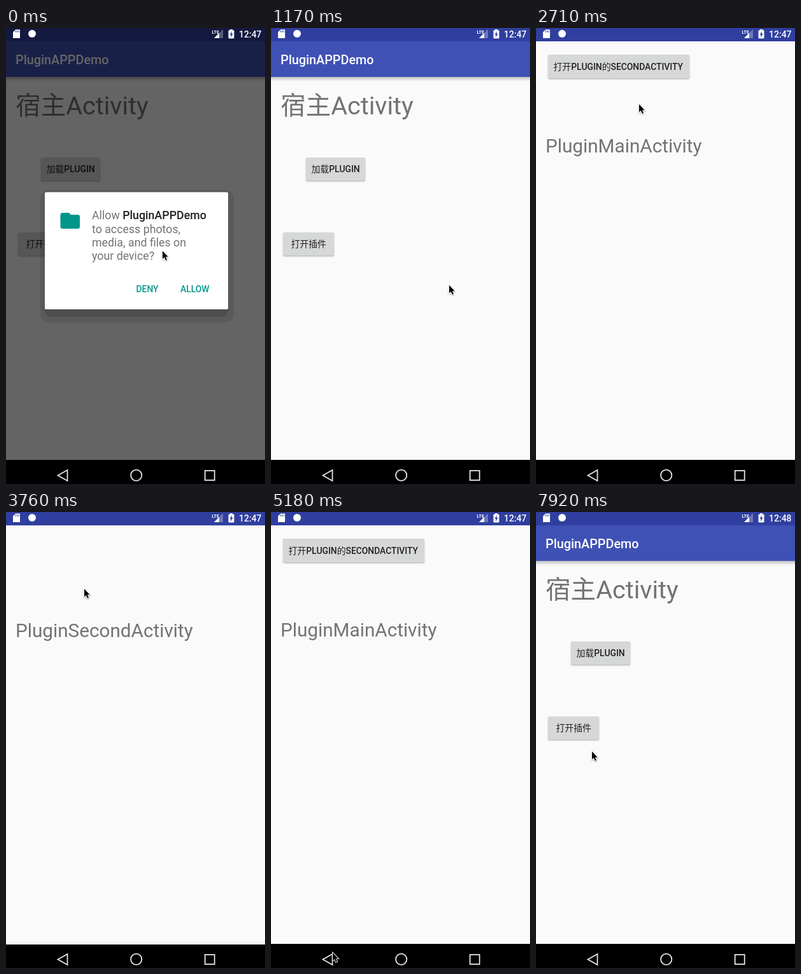
An HTML page with a canvas that plays this animation: 407x718 px, repeating every 8 s.

```html
<!DOCTYPE html>
<html lang="zh-CN">
<head>
<meta charset="utf-8">
<style>
html, body { margin: 0; width: 100%; height: 100%; overflow: hidden; background: #000; }
canvas { display: block; }
</style>
</head>
<body>
<canvas width="407" height="718"></canvas>
<script>
const c = document.querySelector('canvas').getContext('2d');
const LOOP = 8000, STEP = 118;
const GREY = '#737373', TEAL = '#009688';

// Cursor keys: step, x, y
const path = [
  [0, 246, 351], [1, 266, 380], [2, 276, 394], [3, 276, 394], [6, 280, 405], [10, 280, 405],
  [12, 160, 270], [13, 108, 226], [15, 107, 227], [17, 82, 342], [19, 84, 342],
  [21, 125, 322], [22, 180, 257], [23, 162, 120], [25, 124, 66], [30, 124, 66],
  [32, 123, 121], [34, 112, 556], [35, 112, 556], [37, 97, 694], [61, 97, 694],
  [64, 96, 520], [67, 88, 377]
];

// Window states: first step, lower window, upper window, upper offset, upper alpha
const states = [
  [0, host, null, 0, 1],
  [19, host, plugin, 18, .75], [20, host, plugin, 3, 1], [21, plugin, null, 0, 1],
  [31, plugin, second, 14, .85], [32, plugin, second, 1, 1], [33, second, null, 0, 1],
  [43, plugin, second, 14, .5], [44, plugin, null, 0, 1],
  [52, host, plugin, 2, .97], [53, host, plugin, 14, .5], [54, host, null, 0, 1]
];

const within = (n, a, b) => n >= a && n <= b;

function rect(x, y, w, h, color, r = 0) {
  c.fillStyle = color;
  c.beginPath();
  c.roundRect(x, y, w, h, r);
  c.fill();
}

function poly(points, color) {
  c.beginPath();
  points.forEach(([x, y]) => c.lineTo(x, y));
  c.closePath();
  if (color) { c.fillStyle = color; c.fill(); }
}

// Han runs stay at regular weight; returns the end position
function text(s, x, y, size, color, weight = 400) {
  c.fillStyle = color;
  for (const run of s.match(/[一-龥]+|[^一-龥]+/g)) {
    const w = /[一-龥]/.test(run) ? 400 : weight;
    c.font = `${w} ${size}px Roboto, "Noto Sans CJK SC", "Noto Sans CJK", sans-serif`;
    c.fillText(run, x, y);
    x += c.measureText(run).width;
  }
  return x;
}

function button(label, x, y, w, h, pressed) {
  c.save();
  c.shadowColor = 'rgba(0,0,0,.32)';
  c.shadowBlur = pressed ? 5 : 2;
  c.shadowOffsetY = pressed ? 2 : 1;
  rect(x, y, w, h, pressed ? '#c9caca' : '#d6d7d7', 2);
  c.restore();
  text(label, x + (w > 90 ? 8.5 : 12.5), y + h / 2 + 5, 13.86, '#212121', 500);
}

function host(n) {
  rect(0, 21, 407, 659, '#fafafa');
  const shade = c.createLinearGradient(0, 77, 0, 84);
  shade.addColorStop(0, 'rgba(0,0,0,.24)');
  shade.addColorStop(1, 'rgba(0,0,0,0)');
  rect(0, 77, 407, 7, shade);
  rect(0, 21, 407, 56, '#3f51b5');
  text('PluginAPPDemo', 15, 56.5, 19.8, '#fff', 500);
  text('宿主Activity', 15, 135.5, 39.6, GREY);
  button('加载PLUGIN', 55, 204, 93, 36.5, within(n, 14, 15));
  button('打开插件', 19, 322, 80, 36.5, within(n, 17, 18));
}

function plugin(n) {
  rect(0, 21, 407, 659, '#fafafa');
  button('打开PLUGIN的SECONDACTIVITY', 19, 42, 222, 37.5, within(n, 26, 28));
  text('PluginMainActivity', 15, 196, 29.7, GREY);
}

function second() {
  rect(0, 21, 407, 659, '#fafafa');
  text('PluginSecondActivity', 15, 196, 29.7, GREY);
}

function dialog() {
  rect(0, 0, 407, 680, 'rgba(0,0,0,.6)');
  rect(54, 255, 304, 208.5, 'rgba(0,0,0,.1)', 14);
  rect(61, 262, 288, 193, 'rgba(0,0,0,.15)', 10);
  rect(61, 258.5, 288, 184.5, '#fff', 2);
  rect(85.5, 294, 30.5, 22, TEAL, 3);
  rect(85.5, 291, 15, 10, TEAL, 3);
  poly([[97, 291], [99, 291], [102, 294.5], [97, 294.5]], TEAL);
  const x = text('Allow ', 135, 301, 17.8, GREY);
  text('PluginAPPDemo', x, 301, 17.8, '#212121', 500);
  ['to access photos,', 'media, and files on', 'your device?']
    .forEach((line, i) => text(line, 135, 322.5 + i * 21.3, 17.8, GREY));
  text('DENY', 204.5, 416, 13.86, TEAL, 500);
  text('ALLOW', 274, 416, 13.86, TEAL, 500);
}

function statusIcons(n) {
  poly([[15, 2.5], [22, 2.5], [22, 16], [11, 16], [11, 6.5]], '#fff');
  [14.5, 17, 19.5].forEach(x => rect(x, 4, 1, 3, '#303f9f'));
  c.fillStyle = '#fff';
  c.beginPath();
  c.arc(41, 9, 6, 0, 7);
  c.fill();
  text('LTE', 323.5, 8.5, 7, '#fff', 700);
  poly([[341, 2], [341, 16], [327, 16]], 'rgba(255,255,255,.3)');
  poly([[335, 8], [335, 16], [327, 16]], '#fff');
  rect(349.5, 3.5, 9, 13, '#fff', 1);
  rect(352, 2, 4, 2, '#fff');
  poly([[355, 5], [351.5, 10.5], [353.5, 10.5], [353, 15], [356.7, 9], [354.5, 9]], '#303f9f');
  text(n < 65 ? '12:47' : '12:48', 366, 14.7, 14, '#fff', 500);
}

function navIcons(n) {
  if (within(n, 38, 42) || within(n, 50, 53)) {
    const grow = Math.min(1, .6 + (n - (n < 50 ? 38 : 50)) * .2);
    c.save();
    c.beginPath();
    c.rect(0, 680, 407, 38);
    c.clip();
    rect(89 - 54 * grow, 680, 108 * grow, 42, 'rgba(255,255,255,.09)', 20);
    c.restore();
  }
  c.strokeStyle = '#e6e6e6';
  c.lineWidth = 1.8;
  poly([[81.5, 704.5], [96.5, 696], [96.5, 713]]);
  c.stroke();
  c.beginPath();
  c.arc(204.7, 704.3, 8.6, 0, 7);
  c.stroke();
  c.strokeRect(312.7, 697, 15, 15);
}

function cursor(n) {
  const i = Math.max(1, path.findIndex(k => k[0] >= n));
  const [n0, x0, y0] = path[i - 1], [n1, x1, y1] = path[i];
  const p = (n - n0) / (n1 - n0);
  c.save();
  c.translate(x0 + (x1 - x0) * p, y0 + (y1 - y0) * p);
  c.shadowColor = 'rgba(0,0,0,.35)';
  c.shadowBlur = 2;
  c.shadowOffsetY = 1;
  poly([[0, 0], [0, 12.5], [2.8, 10], [5, 14.8], [7, 13.9], [4.9, 9.2], [8.7, 9.2]]);
  c.strokeStyle = '#fff';
  c.lineWidth = 1.8;
  c.stroke();
  c.shadowColor = 'transparent';
  c.fillStyle = '#000';
  c.fill();
  c.restore();
}

function draw(now) {
  const n = Math.floor((now % LOOP + 16) / STEP);
  const [, lower, upper, offset, alpha] = states.findLast(s => s[0] <= n);
  rect(0, 0, 407, 718, '#000');
  rect(0, 0, 407, 21, '#303f9f');
  lower(n);
  if (upper) {
    rect(0, 21, 407, 659, 'rgba(0,0,0,.07)');
    c.save();
    c.globalAlpha = alpha;
    c.translate(0, offset);
    upper(n);
    c.restore();
  }
  if (n < 10) {
    c.globalAlpha = n < 9 ? 1 : .5;
    dialog();
    c.globalAlpha = 1;
  }
  statusIcons(n);
  navIcons(n);
  cursor(n);
  requestAnimationFrame(tick);
}

const start = performance.now();
function tick() { draw(performance.now() - start); }
tick();
</script>
</body>
</html>
```
